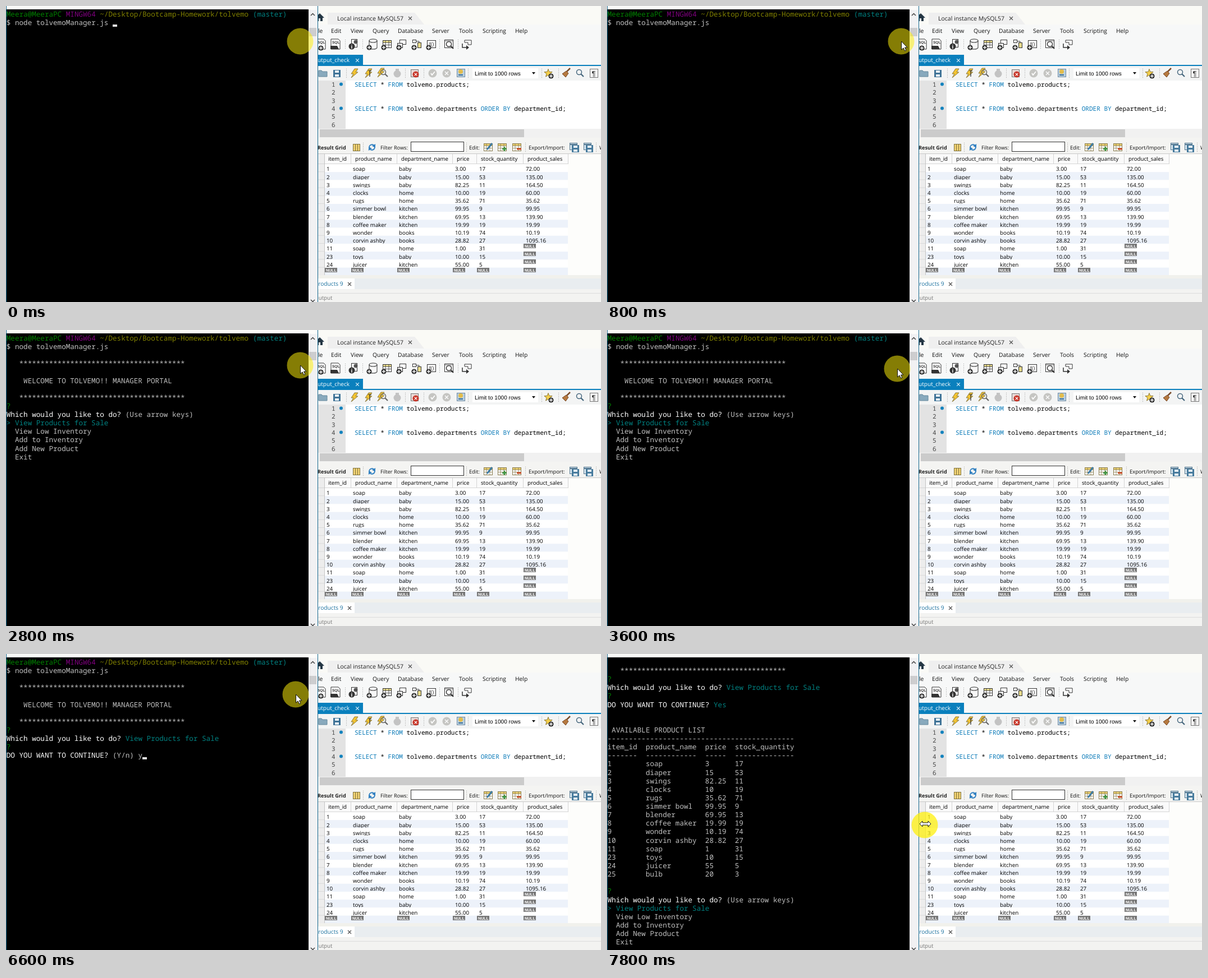
An HTML page with a canvas that plays this animation: 1060x528 px, repeating every 8 s.

```html
<!DOCTYPE html>
<html lang="en">
<head>
<meta charset="utf-8">
<title>Manager portal</title>
<style>
html, body { margin: 0; width: 100%; height: 100%; overflow: hidden; background: #fff; }
canvas { display: block; }
</style>
</head>
<body>
<canvas id="stage" width="1060" height="528"></canvas>
<script>
const W = 1060, H = 528, LOOP = 8000;
const MONO = '"Noto Sans Mono", monospace';
const UI = '"Open Sans", "Noto Sans", sans-serif';
const ARIAL = '"Liberation Sans", sans-serif';
const GREY = '#c0c0c0', WHITE = '#fff', GREEN = '#008000', TEAL = '#008080';
const OLIVE = '#808000', PURPLE = '#800080';
const INK = '#333', BLUE = '#0a7ab8';

const rows = `1|soap|baby|3.00|17|72.00
2|diaper|baby|15.00|53|135.00
3|swings|baby|82.25|11|164.50
4|clocks|home|10.00|19|60.00
5|rugs|home|35.62|71|35.62
6|simmer bowl|kitchen|99.95|9|99.95
7|blender|kitchen|69.95|13|139.90
8|coffee maker|kitchen|19.99|19|19.99
9|wonder|books|10.19|74|10.19
10|corvin ashby|books|28.82|27|1095.16
11|soap|home|1.00|31|
23|toys|baby|10.00|15|
24|juicer|kitchen|55.00|5|`.split('\n').map(r => r.split('|'));

const screen = document.getElementById('stage').getContext('2d');
let g = screen;

function rect(x, y, w, h, color) {
  g.fillStyle = color;
  g.fillRect(x, y, w, h);
}
function frame(x, y, w, h, color, fill) {
  if (fill) rect(x, y, w, h, fill);
  g.strokeStyle = color;
  g.lineWidth = 1;
  g.strokeRect(x + .5, y + .5, w - 1, h - 1);
}
function disc(x, y, r, color) {
  g.fillStyle = color;
  g.beginPath();
  g.arc(x, y, r, 0, Math.PI * 2);
  g.fill();
}
function ring(x, y, r, color, width = 1.3) {
  g.strokeStyle = color;
  g.lineWidth = width;
  g.beginPath();
  g.arc(x, y, r, 0, Math.PI * 2);
  g.stroke();
}
function trace(pts) {
  g.beginPath();
  for (let i = 0; i < pts.length; i += 2) g.lineTo(pts[i], pts[i + 1]);
}
function poly(x, y, pts, fill, stroke) {
  g.save();
  g.translate(x, y);
  trace(pts);
  g.closePath();
  if (fill) { g.fillStyle = fill; g.fill(); }
  if (stroke) { g.strokeStyle = stroke; g.lineWidth = 1; g.stroke(); }
  g.restore();
}
function path(x, y, pts, color, width = 1) {
  g.save();
  g.translate(x, y);
  trace(pts);
  g.strokeStyle = color;
  g.lineWidth = width;
  g.stroke();
  g.restore();
}
function text(s, x, y, size, color = '#111', family = UI, weight = '') {
  g.font = `${weight} ${size}px ${family}`;
  g.fillStyle = color;
  g.fillText(s, x, y);
}
function cross(x, y, r, color) {
  path(x, y, [-r, -r, r, r], color, 1.2);
  path(x, y, [-r, r, r, -r], color, 1.2);
}

// Small icons
function plus(x, y) {
  disc(x, y, 4.6, INK);
  path(x, y, [-3, 0, 3, 0], WHITE, 1.4);
  path(x, y, [0, -3, 0, 3], WHITE, 1.4);
}
function sheet(x, y) {
  poly(x, y, [-8, -9, 5, -9, 8, -6, 8, 9, -8, 9], WHITE, INK);
  text('SQL', x - 6, y - 1, 6.5, INK, ARIAL, 'bold');
}
function table(x, y, head = '#cfcfcf', edge = INK) {
  frame(x - 8, y - 7, 16, 14, edge, WHITE);
  rect(x - 7, y - 6, 14, 3, head);
  for (const d of [-3, 1]) path(x, y, [-8, d + .5, 8, d + .5], edge, .8);
  for (const d of [-3, 3]) path(x, y, [d, -7, d, 7], edge, .8);
}
function lens(x, y, color = INK) {
  ring(x, y, 4.5, color, 1.5);
  path(x, y, [3.2, 3.2, 8, 8], color, 2.2);
}
function bolt(x, y) {
  poly(x, y, [0, -8, 6, -8, 2, -2, 6, -2, -6, 8, -2, 1, -6, 1], '#f4c430', '#8a7a40');
}
function floppy(x, y, color = '#3f7397') {
  rect(x - 6, y - 6, 13, 13, color);
  rect(x - 3, y - 5, 7, 4, '#e8f0f5');
  rect(x - 3, y + 2, 7, 4, '#e8f0f5');
}
function dots(x, y, h) {
  for (let i = 0; i < h; i += 3) rect(x, y + i, 1, 1, '#999');
}

function mainToolbar() {
  const y = 68;
  sheet(561, y); plus(561, 75);
  sheet(587, y); poly(585, 74, [-7, -3, 5, -3, 8, 3, -7, 3], INK);
  frame(615, 59, 11, 15, INK, WHITE);
  disc(616, 72, 5.5, INK); text('i', 614.6, 76, 10, WHITE, ARIAL, 'bold');
  disc(623, 64, 3.5, '#555');
  rect(647, 61, 14, 13, '#f7f7f7');
  g.strokeStyle = INK; g.lineWidth = 1.2;
  for (const [cy, end] of [[62, 2], [74, 1]]) {
    g.beginPath(); g.ellipse(654, cy, 7, 3, 0, 0, Math.PI * end); g.stroke();
  }
  path(654, 68, [-7, -6, -7, 6], INK); path(654, 68, [7, -6, 7, 6], INK);
  plus(647, 74);
  table(679, y, '#e6d98a'); plus(673, 74);
  frame(701, 60, 12, 9, INK, WHITE); frame(697, 66, 10, 9, INK, '#e8e8e8'); plus(700, 74);
  frame(724, 60, 7, 6, INK, WHITE); frame(733, 65, 7, 10, INK, '#e6d98a');
  path(731, 63, [0, 0, 5, 0, 5, 2], INK); plus(727, 74);
  frame(750, 61, 16, 14, INK, WHITE); text('f()', 754, 71, 9, INK, ARIAL); plus(753, 74);
  frame(781, 60, 16, 15, INK, WHITE); rect(782, 61, 14, 3, '#ccc'); lens(789, 68);
  poly(820, 68, [-3, -7, 9, -7, 9, 1, 3, 1, 3, -3, -3, -3], WHITE, INK);
  path(818, 72, [-5, -5, -5, 2, 3, 2], INK, 1.5);
  poly(820, 74, [0, -4, 5, 0, 0, 4], INK);
  for (const x of [604, 635, 772, 805]) dots(x, 60, 17);
}

function queryToolbar() {
  const y = 120;
  poly(565, y, [-8, -5, -3, -5, -1, -3, 7, -3, 7, 6, -8, 6], '#88a9bd', '#64879b');
  floppy(589, y);
  bolt(621, y);
  bolt(646, y); path(648, y, [0, -5, 0, 6], INK, 1.3); path(648, y, [-3, -5, 3, -5], INK);
  bolt(668, y - 1); lens(672, 118, '#666');
  disc(697, 121, 6.5, '#c3c3c3'); rect(694, 112, 6, 7, '#c3c3c3');
  frame(721, 113, 14, 14, '#777', '#ead9d6');
  disc(730, 122, 5.5, '#c73528'); cross(730, 122, 2.3, WHITE);
  disc(760, y, 7.5, '#c5c5c2'); path(760, y, [-3, 0, -1, 3, 4, -3], WHITE, 1.7);
  disc(785, y, 7.5, '#c5c5c2'); cross(785, y, 3, WHITE);
  frame(803, 112, 15, 15, '#6f8aa0', '#b9d0e2');
  disc(810, 117, 4, '#e3bd4c'); path(810, 123, [-4, 0, 4, 0], '#3b6d92', 2);
  rect(831, 111, 117, 18, '#fff');
  text('Limit to 1000 rows', 835, 124, 10.1, '#000', ARIAL);
  poly(940, y, [-3, -2, 3, -2, 0, 2], '#111');
  const star = [];
  for (let i = 0; i < 10; i++) {
    const a = i * Math.PI / 5 - Math.PI / 2, r = i % 2 ? 3.2 : 7.5;
    star.push(Math.cos(a) * r, Math.sin(a) * r);
  }
  poly(966, y, star, '#f4cf4b', '#8f7a35');
  plus(971, 125);
  path(999, 117, [0, 0, 6, -6], '#7a4c2b', 2.5);
  poly(997, 121, [-6, 0, 1, -5, 5, -1, 0, 6], '#b5793f', '#7a4c2b');
  lens(1021, 118, '#44657c');
  frame(1040, 112, 15, 16, '#777', '#f5f5f5');
  text('¶', 1043.5, 125, 13, INK, ARIAL);
  for (const x of [606, 711, 744, 823, 954, 984]) dots(x, 112, 16);
}

function resultToolbar() {
  text('Result Grid', 555, 255.5, 9.2, '#222', UI, 'bold');
  frame(618, 246, 13, 13, '#80733d', '#f0d173');
  for (const x of [622.5, 626.5]) path(x, 252, [0, -6, 0, 6], '#80733d');
  for (const a of [-.4, Math.PI - .4]) {
    g.save(); g.translate(652, 252); g.rotate(a);
    g.strokeStyle = '#2f7fc0'; g.lineWidth = 2;
    g.beginPath(); g.arc(0, 0, 4.8, Math.PI, Math.PI * 1.85); g.stroke();
    poly(5, -1, [-4, -1, 3, -2, 0, 4], '#2f7fc0');
    g.restore();
  }
  text('Filter Rows:', 667, 255.5, 9.2);
  frame(721, 242, 95, 18, '#333', '#fff');
  text('Edit:', 825, 255.5, 9.2);
  for (const x of [859, 884, 910]) table(x, 252, '#e6cc70', '#8a7d50');
  path(857, 256, [0, 0, 9, -11], '#3d7ca5', 3);
  path(888, 255, [-4, 0, 4, 0], '#3c9440', 2.5);
  path(888, 255, [0, -4, 0, 4], '#3c9440', 2.5);
  path(914, 255, [-4, 0, 4, 0], '#c94b26', 3);
  text('Export/Import:', 931, 255.5, 9.4);
  for (const x of [1011, 1036]) {
    frame(x - 7, 244, 14, 13, '#53778f', '#d9e7f0');
    path(x, 247, [-6, 0, 6, 0], '#53778f', 2);
    floppy(x + 3, 254, '#477b9d');
  }
  text('Wrap', 1057, 255.5, 9.2);
  for (const x of [636, 820, 925, 1051]) dots(x, 244, 16);
}

function badge(x, y) {
  rect(x, y, 22, 8, '#777');
  text('NULL', x + 2, y + 7, 7, '#fff', ARIAL, 'bold');
}

function resultGrid() {
  const cols = [568, 615, 697, 796, 839, 922], step = 14.2;
  const heads = ['item_id', 'product_name', 'department_name', 'price', 'stock_quantity', 'product_sales'];
  const headX = [574, 622, 704, 803, 846, 929];
  const cellX = [571, 618, 700, 800, 843, 926];
  rect(556, 263, 504, 222, '#fdfdfb');
  rect(556, 263, 12, 217, '#ededed');
  rect(568, 263, 433, 18, '#fafafa');
  rect(556, 263, 504, 1, '#c8c8c8');
  rect(556, 281, 446, 1, '#d6d6d6');
  rect(567, 263, 1, 217, '#c4c4c4');
  heads.forEach((h, i) => {
    text(h, headX[i], 276, 9.7, '#000');
    if (i) rect(cols[i] - 1, 264, 1, 17, '#d4d4d4');
  });
  rect(1001, 264, 1, 17, '#d4d4d4');
  for (let i = 0; i <= rows.length; i++) {
    const top = 282 + i * step, base = top + 12.3;
    rect(568, top, 433, step, i % 2 ? '#edf2fa' : '#fff');
    rect(556, top + step - 1, 11, 1, '#dadada');
    if (i === rows.length) break;
    g.save();
    g.beginPath();
    g.rect(556, top - 2, 504, step + 1.5);
    g.clip();
    rows[i].forEach((v, c) => text(v, cellX[c], base, 9.8, '#000'));
    g.restore();
  }
  for (let i = 10; i < 13; i++) badge(922, 424 + Math.round((i - 10) * step));
  cols.forEach(x => badge(x, 467));
}

function editor() {
  rect(556, 133, 504, 87, '#fff');
  rect(556, 133, 49, 87, '#e3e3e3');
  const queries = {
    0: [['SELECT', BLUE], [' * ', '#000'], ['FROM', BLUE], [' tolvemo.products;', '#000']],
    3: [['SELECT', BLUE], [' * ', '#000'], ['FROM', BLUE], [' tolvemo.departments ', '#000'],
        ['ORDER BY', BLUE], [' department_id;', '#000']]
  };
  for (let n = 0; n < 6; n++) {
    const y = 144 + n * 14.3;
    text(n + 1, 580, y, 11, '#444', MONO);
    if (!queries[n]) continue;
    disc(597, y - 4.5, 3, '#1583bd');
    let x = 621;
    for (const [s, color] of queries[n]) {
      text(s, x, y, 11.03, color, MONO);
      x += g.measureText(s).width;
    }
  }
  rect(556, 219, 504, 16, '#f1f1f1');
  rect(559, 220, 364, 14, '#cbcbcb');
}

function workbench() {
  rect(556, 0, 504, H, '#f7f8f8');
  rect(556, 0, 504, 33, '#fafaf6');
  poly(0, 0, [573, 33, 573, 12, 728, 12, 745, 33], '#efefef');
  poly(559, 20, [-9, 1, 0, -7, 8, 1, 5, 1, 5, 7, 1, 7, 1, 2, -2, 2, -2, 7, -6, 7, -6, 1], '#253744');
  text('Local instance MySQL57', 590, 25.5, 10.5, '#222');
  cross(720, 22, 3, '#555');
  const menu = [['File', 548], ['Edit', 579], ['View', 614], ['Query', 653], ['Database', 698],
    ['Server', 759], ['Tools', 807], ['Scripting', 849], ['Help', 907]];
  for (const [s, x] of menu) text(s, x, 47.5, 10.3, '#111');
  mainToolbar();
  rect(556, 87, 80, 18, '#0a80bd');
  rect(556, 105, 504, 2, '#0a80bd');
  text('output_check', 549, 100, 10.1, '#fff');
  cross(626, 97, 2.8, '#d9edf7');
  rect(556, 107, 504, 26, '#f3f4f4');
  queryToolbar();
  editor();
  rect(556, 235, 504, 28, '#f4f4f2');
  resultToolbar();
  resultGrid();
  rect(556, 480, 504, 6, '#f1f1ec');
  rect(556, 486, 504, 19, '#e9edf0');
  rect(556, 486, 65, 19, '#fff');
  text('products 9', 550, 499, 10.2, '#1b719f');
  cross(612, 496, 3, '#555');
  rect(556, 505, 504, 23, '#f3f3f1');
  rect(556, 512, 504, 1, '#dcdcdc');
  text('Output', 549, 524, 9.8, '#777');
}

// Console: each line is a row number and coloured parts
const CELL = 7.57, PITCH = 15.13;
const baseline = n => 34 + (n - 1) * PITCH;
function put(n, ...parts) {
  let col = 0;
  for (const [s, color = GREY] of parts) {
    text(s, .8 + col * CELL, baseline(n), CELL / .6, color, MONO);
    col += s.length;
  }
}
function caret(n, col) {
  rect(Math.round(.6 + col * CELL), Math.round(baseline(n)) - 1, 8, 4, '#e4e4e4');
}
const stars = n => put(n, ['   ' + '*'.repeat(39)]);
const ASK = ['Which would you like to do? ', WHITE];
const GO_ON = ['DO YOU WANT TO CONTINUE? ', WHITE];
const mark = n => put(n, ['?', GREEN]);

function menuAt(n) {
  mark(n);
  put(n + 1, ASK, ['(Use arrow keys)']);
  put(n + 2, ['> View Products for Sale', TEAL]);
  ['View Low Inventory', 'Add to Inventory', 'Add New Product', 'Exit']
    .forEach((s, i) => put(n + 3 + i, ['  ' + s]));
}
function answered(n) {
  mark(n);
  put(n + 1, ASK, ['View Products for Sale', TEAL]);
  mark(n + 2);
}
function productList() {
  stars(1);
  answered(2);
  put(5, GO_ON, ['Yes', TEAL]);
  put(8, [' AVAILABLE PRODUCT LIST']);
  put(9, ['-'.repeat(44)]);
  const widths = [7, 12, 5, 14];
  const join = cells => cells.map((c, i) => String(c).padEnd(widths[i])).join('  ');
  put(10, [join(['item_id', 'product_name', 'price', 'stock_quantity'])]);
  put(11, [join(widths.map(w => '-'.repeat(w)))]);
  [...rows, ['25', 'bulb', '', '20', '3']].forEach((r, i) =>
    put(12 + i, [join([r[0], r[1], +r[3], r[4]])]));
  menuAt(27);
}

function consoleText(t) {
  if (t >= 6800) return productList();
  put(0, ['Meera@MeeraPC ', GREEN], ['MINGW64 ', PURPLE],
    ['~/Desktop/Bootcamp-Homework/tolvemo ', OLIVE], ['(master)', TEAL]);
  put(1, ['$ node tolvemoManager.js']);
  if (t < 200) caret(1, 25);
  if (t < 2800) {
    if ((t >= 1400 && t < 1800) || t >= 2400) caret(2, 0);
    return;
  }
  stars(3);
  put(5, ['    WELCOME TO TOLVEMO!! MANAGER PORTAL']);
  stars(7);
  if (t < 4400) return menuAt(8);
  answered(8);
  put(11, GO_ON, [t < 6000 ? '(Y/n)' : '(Y/n) y']);
  if ((t >= 4600 && t < 5000) || (t >= 5600 && t < 6000)) caret(11, 31);
  if (t >= 6600) caret(11, 32);
}

function terminal(t) {
  rect(0, 0, 556, H, '#fcfcfa');
  rect(1, 6, 538, H - 6, '#000');
  consoleText(t);
  rect(539, 7, 16, H - 7, '#f1f1f3');
  rect(540, 39, 13, 15, '#cdcdcf');
  path(546.5, 15, [-3.5, 2, 0, -1.5, 3.5, 2], '#444', 1.5);
  path(546.5, 526, [-3.5, -2, 0, 1.5, 3.5, -2], '#444', 1.5);
  rect(0, 0, 1, H, '#17698f');
  rect(555, 0, 1, H, '#17698f');
}

// Pointer stops: time, x, y
const stops = [[0, 524, 63], [3400, 520, 66], [3600, 517, 69], [3800, 516, 71], [4000, 516, 72], [7800, 566, 305]];
function pointer(t) {
  const [, x, y] = stops.filter(s => s[0] <= t).pop();
  const resize = t >= 7800;
  disc(x, y, 23.5, `rgba(255,240,10,${resize ? .74 : .52})`);
  if (resize) {
    poly(567, 303, [-10, 0, -5, -5, -5, -2, 5, -2, 5, -5, 10, 0, 5, 5, 5, 2, -5, 2, -5, 5], '#fff', '#111');
  } else if (t >= 200) {
    poly(x + .5, y, [0, 0, 0, 15, 3.5, 11.8, 6, 17, 8.3, 16, 6, 11, 10.5, 11], '#fff', '#111');
  }
}

const panel = document.createElement('canvas');
panel.width = W;
panel.height = H;
g = panel.getContext('2d');
g.textRendering = 'geometricPrecision';
workbench();
g = screen;
g.textRendering = 'geometricPrecision';

const start = performance.now();
function draw(now) {
  const t = Math.floor(Math.max(0, now - start) % LOOP / 200) * 200;
  g.drawImage(panel, 0, 0);
  terminal(t);
  pointer(t);
  requestAnimationFrame(draw);
}
draw(start);
</script>
</body>
</html>
```
